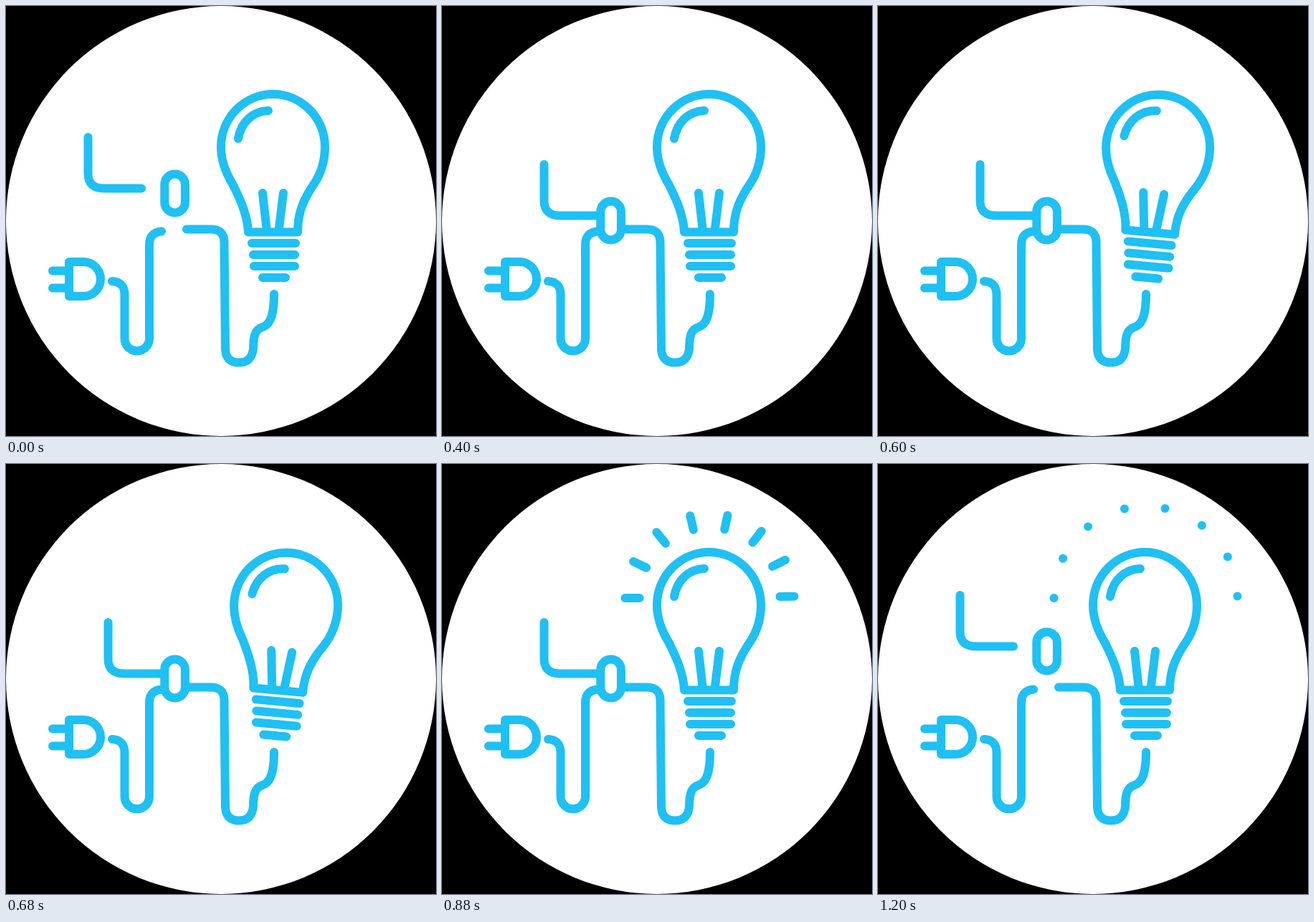
An HTML page that plays this animation: 600x600 px, repeating every 1280 ms.

```html
<!DOCTYPE html>
<html lang="en">
<head>
<meta charset="utf-8">
<title>Light bulb</title>
<style>
  html, body { margin: 0; width: 100%; height: 100%; overflow: hidden; background: #000; }
  svg { display: block; width: 100%; height: 100%; }
  .ink { fill: none; stroke: #1fc0f3; stroke-width: 12; stroke-linecap: round; stroke-linejoin: round; }
</style>
</head>
<body>
<svg viewBox="0 0 600 600">
  <circle cx="300" cy="300" r="300" fill="#fff"/>
  <g class="ink">
    <!-- plug and cord -->
    <path d="M65 369.5H86M65 393.5H86M88 357H108A24 24 0 0 1 108 405H88Z"/>
    <path d="M148 384Q165.5 385 165.5 403V464A17.25 17.25 0 0 0 200 464V333Q200 316 217 314.5"/>
    <path d="M252 311.5H286Q304 311.5 304.5 329L306 479Q307 497.5 325 497.5Q343 497.5 345 478C345 460 348 451 358 448C371 444 374 425 374 402"/>
    <!-- switch -->
    <path id="hook" d="M114.5 183V234Q114.5 254.5 137 254.5H189"/>
    <rect id="ring" x="221.3" y="234.5" width="28.6" height="54" rx="14.3" fill="#fff"/>
    <g id="bulb">
      <path d="M338 315.5C337 293 328 272 316.5 249Q300 222 300 197A72.5 74 0 0 1 445 197Q445 225 430 248C414 271 407 290 407 315.5Z"/>
      <path d="M324 185C328 162 344 147 366 146M358 261L363.5 310M387 261L381 310"/>
      <path d="M343 331H404M345 347H403M346 363H403M358 379H390"/>
    </g>
    <g id="rays"></g>
  </g>
</svg>
<script>
const LOOP = 1280, STEP = 40;
const $ = id => document.getElementById(id);
const hook = $('hook'), ring = $('ring'), bulb = $('bulb'), rays = $('rays');

const clamp = v => Math.min(1, Math.max(0, v));
const ramp = (t, from, to) => clamp((t - from) / (to - from));

const RAY = { x: 373.5, y: 187, inner: 98, length: 30, count: 8, gap: 25.55 };
const lines = Array.from({ length: RAY.count }, (_, i) => {
  const line = document.createElementNS('http://www.w3.org/2000/svg', 'path');
  const a = (180 + i * RAY.gap) * Math.PI / 180;
  rays.append(line);
  return { line, cos: Math.cos(a), sin: Math.sin(a) };
});

function drawRays(t) {
  const start = ramp(t, 960, 1200), end = ramp(t, 720, 960);
  rays.style.display = t < 720 ? 'none' : '';
  for (const { line, cos, sin } of lines) {
    const at = k => {
      const r = RAY.inner + RAY.length * k;
      return `${(RAY.x + r * cos).toFixed(2)} ${(RAY.y + r * sin).toFixed(2)}`;
    };
    line.setAttribute('d', `M${at(start)}L${at(end)}`);
  }
}

function draw(t) {
  const dx = 28 * (ramp(t, 0, 160) - ramp(t, 1120, 1200));
  const dy = 38 * (ramp(t, 240, 400) - ramp(t, 880, 1040));
  const tilt = -7.5 * Math.sin(ramp(t, 400, 720) * 2 * Math.PI);
  hook.setAttribute('transform', `translate(${dx} ${dy})`);
  ring.setAttribute('transform', `translate(0 ${dy})`);
  bulb.setAttribute('transform', `rotate(${tilt.toFixed(3)} 374 393)`);
  drawRays(t);
}

const origin = performance.now();
function tick() {
  const t = (performance.now() - origin) % LOOP;
  draw(Math.floor(t / STEP) * STEP);
  requestAnimationFrame(tick);
}
tick();
</script>
</body>
</html>
```
